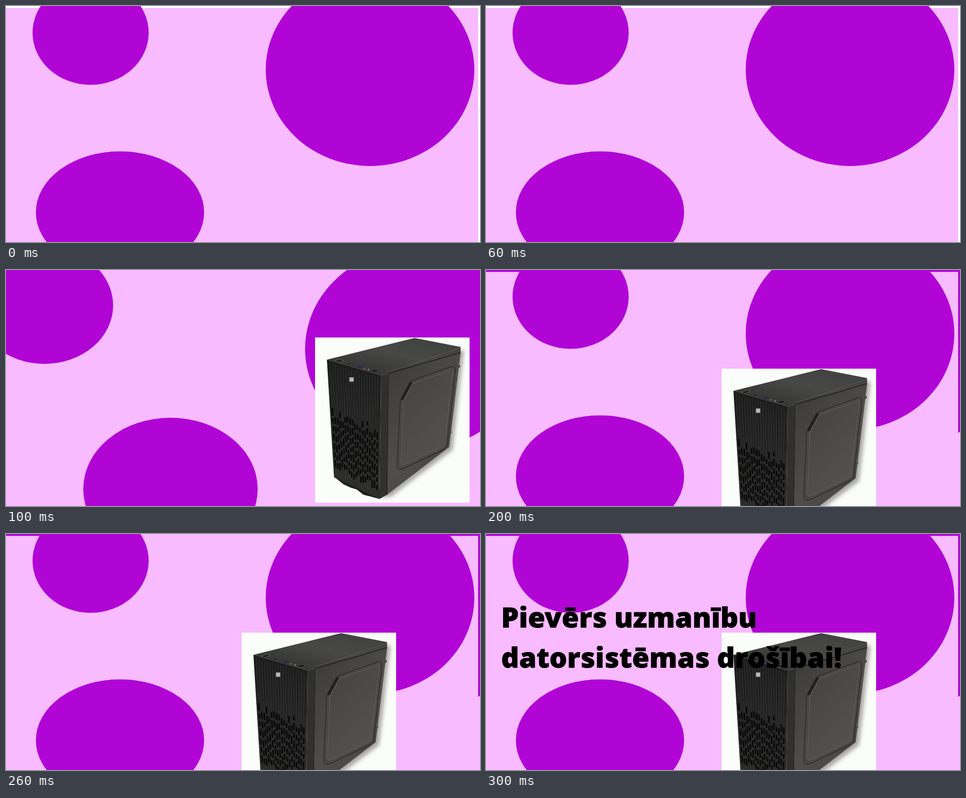
An HTML page for the animation above (0.4 s loop, 1000 by 500 pixels).

```html
<!DOCTYPE html>
<html lang="lv">
<head>
<meta charset="utf-8">
<title>Datorsistēmas drošība</title>
<style>
  html, body { margin: 0; width: 100%; height: 100%; overflow: hidden; background: #fff; }
  svg { display: block; width: 100%; height: 100%; }
  .pink { fill: #f8bbff; }
  .blob { fill: #b105d6; }
  .headline {
    font: 800 58.8px "Open Sans", "Noto Sans", sans-serif;
    letter-spacing: .1px;
    stroke: #000;
    stroke-width: .9;
  }
</style>
</head>
<body>
<svg viewBox="0 0 1000 500" xmlns="http://www.w3.org/2000/svg">
  <defs>
    <linearGradient id="lid" x1="0" y1="1" x2="1" y2="0">
      <stop offset="0" stop-color="#2c2c2c"/>
      <stop offset=".55" stop-color="#484847"/>
      <stop offset="1" stop-color="#3f3f3e"/>
    </linearGradient>
    <linearGradient id="side" x1="0" y1="0" x2=".7" y2="1">
      <stop offset="0" stop-color="#3a3938"/>
      <stop offset=".6" stop-color="#504e4c"/>
      <stop offset="1" stop-color="#454341"/>
    </linearGradient>
    <linearGradient id="panel" x1="0" y1="0" x2=".6" y2="1">
      <stop offset="0" stop-color="#454342"/>
      <stop offset="1" stop-color="#545250"/>
    </linearGradient>
    <linearGradient id="front" x1="0" y1="0" x2="0" y2="1">
      <stop offset="0" stop-color="#1b1b1b"/>
      <stop offset="1" stop-color="#2f2f2e"/>
    </linearGradient>
    <filter id="soft" x="-20%" y="-20%" width="140%" height="140%">
      <feGaussianBlur stdDeviation="4.5"/>
    </filter>
    <clipPath id="photo"><rect width="326" height="350"/></clipPath>
  </defs>

  <g id="wide">
    <rect class="pink" width="1000" height="500"/>
    <ellipse class="blob" cx="81" cy="75" rx="145" ry="124"/>
    <ellipse class="blob" cx="866" cy="167" rx="235" ry="213.7"/>
    <ellipse class="blob" cx="347" cy="464" rx="184" ry="151"/>
  </g>

  <g id="inset">
    <rect class="pink" y="4" width="996" height="496"/>
    <ellipse class="blob" cx="178.5" cy="56.5" rx="122.5" ry="110.5"/>
    <ellipse class="blob" cx="768" cy="134.7" rx="220" ry="204.3"/>
    <ellipse class="blob" cx="240.5" cy="437" rx="177.5" ry="129"/>
  </g>

  <g id="tower">
    <g clip-path="url(#photo)">
      <rect width="326" height="350" fill="#fbfdfa"/>
      <path d="M290 28L314 27 290 238 160 337 137 338Z" fill="#888" opacity=".75" filter="url(#soft)"/>
      <path d="M302 58l4 1v4l-4 1zM286 198l2 1v3l-3 1z" fill="#333"/>
      <path d="M40 295L60 311 75 318 88 322 102 333 136 342 152 332 145 320Z" fill="#1d1d1d"/>
      <path d="M25 47L210 1 307 20V32L155 76 139 80Z" fill="url(#lid)"/>
      <path d="M155 76L307 32 283 232 152 333Z" fill="url(#side)"/>
      <path d="M155 76L307 32" stroke="#181818" stroke-width="1.5"/>
      <path d="M153 73L307 22" stroke="#5a5a59"/>
      <path d="M139 80L155 76 152 333 136 342Z" fill="#30302f"/>
      <path d="M155 76L152 333" stroke="#181818"/>
      <path d="M201 93L286 62Q297 59 296 70L279 226Q278 234 270 238L186 278Q172 283 173 268L180 132Z"
            fill="#4a4846" stroke="#292828" stroke-width="1.5"/>
      <path d="M206 98L286 69Q291 68 290 74L274 225Q273 230 268 232L190 269Q180 273 181 263L187 135Z"
            fill="url(#panel)" stroke="#62605e" stroke-width="1"/>
      <path d="M203 95L183 132" stroke="#202020" stroke-width="5"/>
      <path d="M25 47L139 80 136 342 40 296Z" fill="url(#front)"/>
      <path id="ribs" stroke="#363636" fill="none"/>
      <path id="slots" stroke="#080808" stroke-width="3" fill="none"/>
      <path d="M41 49l14-3 6 3-13 4z" fill="#1d1d1d" stroke="#626262"/>
      <path d="M67 55l6-1 3 2-6 2z" fill="#151515" stroke="#505050" stroke-width=".7"/>
      <path d="M87 62l10-2 4 2-10 3z" fill="#202c55"/>
      <path d="M119 70l11-2 4 2-11 3z" fill="#0c0c0c" stroke="#555" stroke-width=".6"/>
      <circle cx="104" cy="66" r="2" fill="#964e49"/>
      <circle cx="113" cy="68" r="2" fill="#727868"/>
      <rect x="72.5" y="84.5" width="9" height="9" fill="#b7b7b7"/>
    </g>
  </g>

  <g id="headline" class="headline">
    <text x="32" y="198">Pievērs uzmanību</text>
    <text x="32" y="283">datorsistēmas drošībai!</text>
  </g>
</svg>
<script>
  const el = id => document.getElementById(id);
  const mix = (a, b, t) => a + (b - a) * t;

  // Maps u (across) and v (down) onto the slanted front panel.
  function onFront(u, v) {
    const x = mix(mix(25, 40, v), mix(139, 136, v), u);
    const y = mix(mix(47, 296, v), mix(80, 342, v), u);
    return x.toFixed(1) + ' ' + y.toFixed(1);
  }
  const line = (u, v0, v1) => `M${onFront(u, v0)}L${onFront(u, v1)}`;

  function drawGrille() {
    let seed = 7;
    const random = () => (seed = seed * 16807 % 2147483647) / 2147483647;
    const columns = 19;
    let ribs = '', slots = '';
    for (let i = 0; i < columns; i++) {
      const u = .05 + .89 * i / (columns - 1);
      ribs += line(u, .02, .97);
      let v = .4 + random() * .1;
      while (v < .9) {
        const end = Math.min(v + .035 + random() * .035, .94);
        slots += line(u, v, end);
        v = end + .022;
      }
    }
    el('ribs').setAttribute('d', ribs);
    el('slots').setAttribute('d', slots);
  }

  const show = (id, on) => el(id).setAttribute('visibility', on ? 'visible' : 'hidden');

  function draw(time) {
    const step = Math.floor(time % 400 / 100);
    show('wide', step > 0);
    show('inset', step !== 1);
    show('tower', step > 0);
    show('headline', step === 3);
    el('tower').setAttribute('transform', step === 1 ? 'translate(652 143)' : 'translate(497 209)');
  }

  drawGrille();
  draw(0);
  const start = performance.now();
  function tick(now) {
    draw(Math.max(0, now - start));
    requestAnimationFrame(tick);
  }
  requestAnimationFrame(tick);
</script>
</body>
</html>
```
